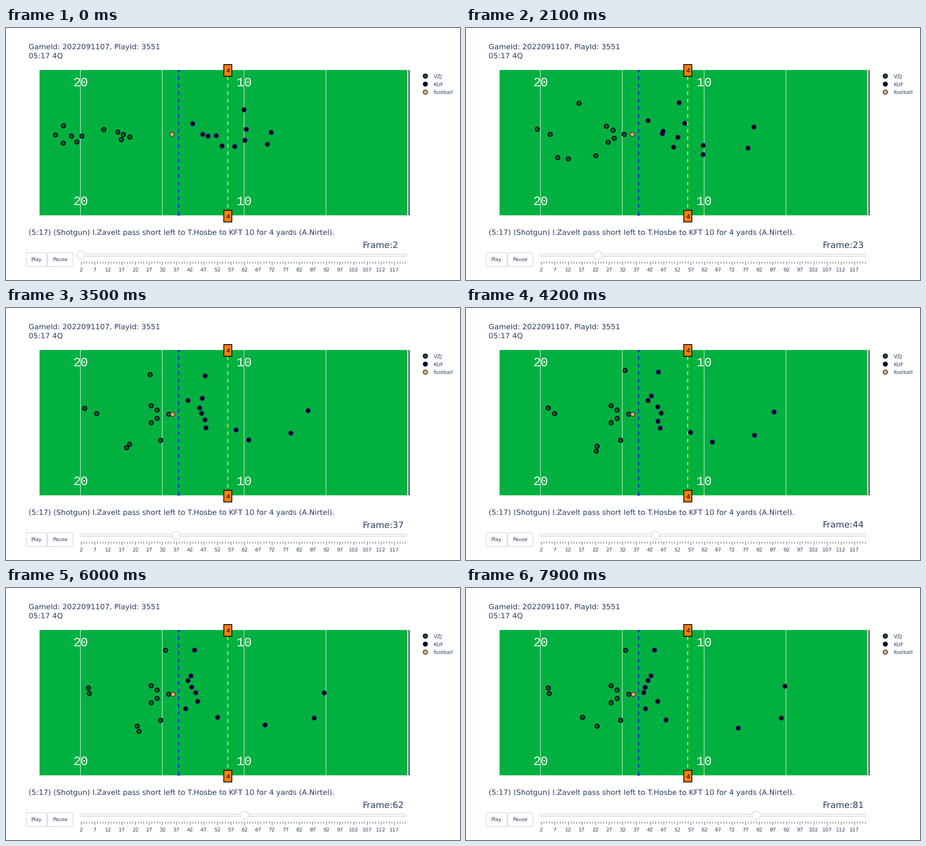
Recreate the animation shown at these times as a matplotlib script. Size 1004 px wide and 558 px high, loop 8000 ms.

```python
import numpy as np
import matplotlib.pyplot as plt
from matplotlib.animation import FuncAnimation
from matplotlib.patches import Circle, FancyBboxPatch, Rectangle

W, H, DPI = 1004, 558, 64
FRAMES, INTERVAL = 80, 100
INK, BORDER = "#2a3f5f", "#bec8d9"
LEFT, RIGHT, TOP, BOTTOM = 74.2, 887.7, 93, 414.8
GRID0, GRID = 164.5, 181.05        # first yard line, five yards
SLIDE0, SLIDE = 165.5, 6.03        # slider start, one step

TEAMS = {
    "VZJ": ("#125740", "#000000"),
    "KUF": ("#000000", "#241773"),
    "football": ("#cbb67c", "#663831"),
}
OFFENCE, DEFENCE, BALL = TEAMS

plt.rcParams["text.hinting"] = "none"


def pt(px):
    return px * 72 / DPI


fig = plt.figure(figsize=(W / DPI, H / DPI), dpi=DPI, facecolor="white")
ax = fig.add_axes([0, 0, 1, 1])
ax.set(xlim=(0, W), ylim=(H, 0))
ax.axis("off")


def label(x, y, s, size, color=INK, ha="left", font="DejaVu Sans", z=3):
    return ax.text(x, y, s, fontsize=pt(size), color=color, ha=ha,
                   va="baseline", family=font, zorder=z)


def line(x, y0, y1, color, width, z=2, **kw):
    ax.plot([x, x], [y0, y1], color=color, lw=pt(width), zorder=z, snap=False,
            solid_capstyle="butt", dash_capstyle="butt", **kw)


def rounded(x0, y0, x1, y1, r, fill):
    ax.add_patch(FancyBboxPatch(
        (x0, y0), x1 - x0, y1 - y0, fc=fill, ec=BORDER, lw=pt(0.95),
        boxstyle=f"round,pad=0,rounding_size={r}", zorder=3))


def dot(team, x, y, z):
    fill, edge = TEAMS[team]
    return ax.add_patch(Circle((x, y), 4.7, fc=fill, ec=edge,
                               lw=pt(1.85), zorder=z))


movers = []


def walk(team, last, *stops):
    """Pass the stops at an even beat up to frame `last`, then stand still."""
    beats = np.linspace(0, last, len(stops))
    path = np.array([np.interp(np.arange(FRAMES), beats, axis)
                     for axis in zip(*stops)])
    # soften the turns
    wide = np.pad(path, ((0, 0), (1, 1)), mode="edge")
    path = (wide[:, :-2] + 2 * path + wide[:, 2:]) / 4
    z = 10 + list(TEAMS).index(team)
    movers.append((dot(team, *path[:, 0], z), path))


def draw_field():
    ax.add_patch(Rectangle((LEFT, TOP), RIGHT - LEFT, BOTTOM - TOP,
                           fc="#00b140", lw=0, snap=False, zorder=1))
    for k in range(4):
        line(GRID0 + GRID * k, TOP, BOTTOM, "white", 1)
    line(891.3, TOP, BOTTOM, "black", 2)

    scrimmage, target = GRID0 + 1.2 * GRID, GRID0 + 1.8 * GRID
    for x, color in ((scrimmage, "blue"), (target, "yellow")):
        line(x, BOTTOM, TOP, color, 1.85, z=4, linestyle=(0, (4.5, 4.5)))
    for y in (TOP + 1, BOTTOM - 0.7):
        ax.plot([scrimmage - 2.4, scrimmage + 2.4], [y, y], color="blue",
                lw=pt(1.4), zorder=4)

    for k, yards in ((0, "20"), (2, "10")):
        for y in (130, 393):
            label(GRID0 + GRID * k, y, yards, 27.7, "white", "center",
                  "Liberation Mono")
    for y in (TOP, BOTTOM + 0.7):
        ax.add_patch(Rectangle((target - 8.8, y - 12), 17.8, 26, fc="#ff7f0e",
                               ec="black", lw=pt(1.85), snap=False, zorder=5))
        label(target, y + 6, "4", 14.8, "black", "center",
              "Liberation Mono", 6)


def draw_text():
    label(49.5, 47, "GameId: 2022091107, PlayId: 3551", 16.35)
    label(49.5, 67, "05:17 4Q", 16.35)
    label(49.5, 458, "(5:17) (Shotgun) I.Zavelt pass short left to T.Hosbe "
          "to KFT 10 for 4 yards (A.Nirtel).", 16.33)
    for k, team in enumerate(TEAMS):
        y = 106.5 + 17.8 * k
        dot(team, 927.3, y, 5)
        label(945.5, y + 4.2, team, 11.4)


def draw_controls():
    for x0, x1, s in ((44.6, 90.4, "Play"), (92.4, 148.4, "Pause")):
        rounded(x0, 497.6, x1, 528.4, 2, "white")
        label((x0 + x1) / 2, 516.2, s, 11.3, ha="center")
    rounded(163.5, 500.5, 885, 505.5, 2, "#f8fafc")
    ticks = np.arange(120)
    ax.vlines(SLIDE0 + SLIDE * ticks, 517, np.where(ticks % 5, 521, 524),
              color="#333333", lw=pt(0.95), zorder=3)
    for n in ticks[::5]:
        label(SLIDE0 + SLIDE * n, 538.6, str(n + 2), 11.2, ha="center")


draw_field()
draw_text()
draw_controls()
grip = ax.add_patch(Circle((SLIDE0, 503.2), 9.3, fc="white", ec=BORDER,
                           lw=pt(0.95), zorder=6))
counter = label(788.3, 486.8, "Frame:2", 19.4)

# Five linemen form a wedge with the centre at its tip
for k, x in enumerate((215, 246, 258, 273, 254)):
    tip = 360 - 26 * abs(k - 2) ** 0.585
    y0, y1 = 225 + 5.5 * k, 216.5 + 9.4 * k
    walk(OFFENCE, 24, (x, y0), (x + 0.6 * (tip - x), (y0 + y1) / 2), (tip, y1))

# Backs and receivers
walk(OFFENCE, 42, (109, 237), (158, 224), (182, 221.4))
walk(OFFENCE, 42, (125.5, 217), (250, 166.5), (353, 138))
walk(OFFENCE, 60, (144.5, 239.5), (204, 234), (184, 233.7))
walk(OFFENCE, 40, (167, 238.7), (223, 289), (290, 306))
walk(OFFENCE, 32, (155, 252), (262, 278), (342, 293))
walk(OFFENCE, 79, (125.5, 254.5), (197, 285), (287, 316.5), (295.5, 319),
     (257.3, 286))

# Defence, front to back
walk(DEFENCE, 21, (413, 212), (402.5, 205))
walk(DEFENCE, 79, (435, 235.5), (434, 234), (430, 232), (392.7, 231.5))
walk(DEFENCE, 79, (447, 239.5), (426, 219), (396, 220))
walk(DEFENCE, 42, (464.7, 238.5), (481, 240), (456, 244), (424, 251))
walk(DEFENCE, 60, (478, 261.3), (451, 265), (397, 267.5))
walk(DEFENCE, 79, (505.7, 262.3), (541, 296), (602.5, 310.5))
walk(DEFENCE, 46, (527, 181.3), (466, 164), (417, 137.5))
walk(DEFENCE, 42, (532, 224.5), (484, 211), (409, 194.5))
walk(DEFENCE, 79, (528.3, 248.7), (524, 263), (478, 284), (442, 292.3))
walk(DEFENCE, 79, (577.5, 257.3), (623, 265), (632, 281), (681, 288),
     (697.5, 288))
walk(DEFENCE, 79, (586, 231.5), (634, 218.5), (678, 230), (703.7, 233),
     (705.3, 217.3))

walk(BALL, 79, (367, 235.6), (370.3, 235.6))


def update(i):
    for patch, path in movers:
        patch.center = path[:, i]
    grip.center = SLIDE0 + SLIDE * i, 503.2
    counter.set_text(f"Frame:{i + 2}")
    return [counter, grip] + [patch for patch, _ in movers]


anim = FuncAnimation(fig, update, frames=FRAMES, interval=INTERVAL,
                     repeat=True, repeat_delay=0, blit=False)
plt.show()
```
